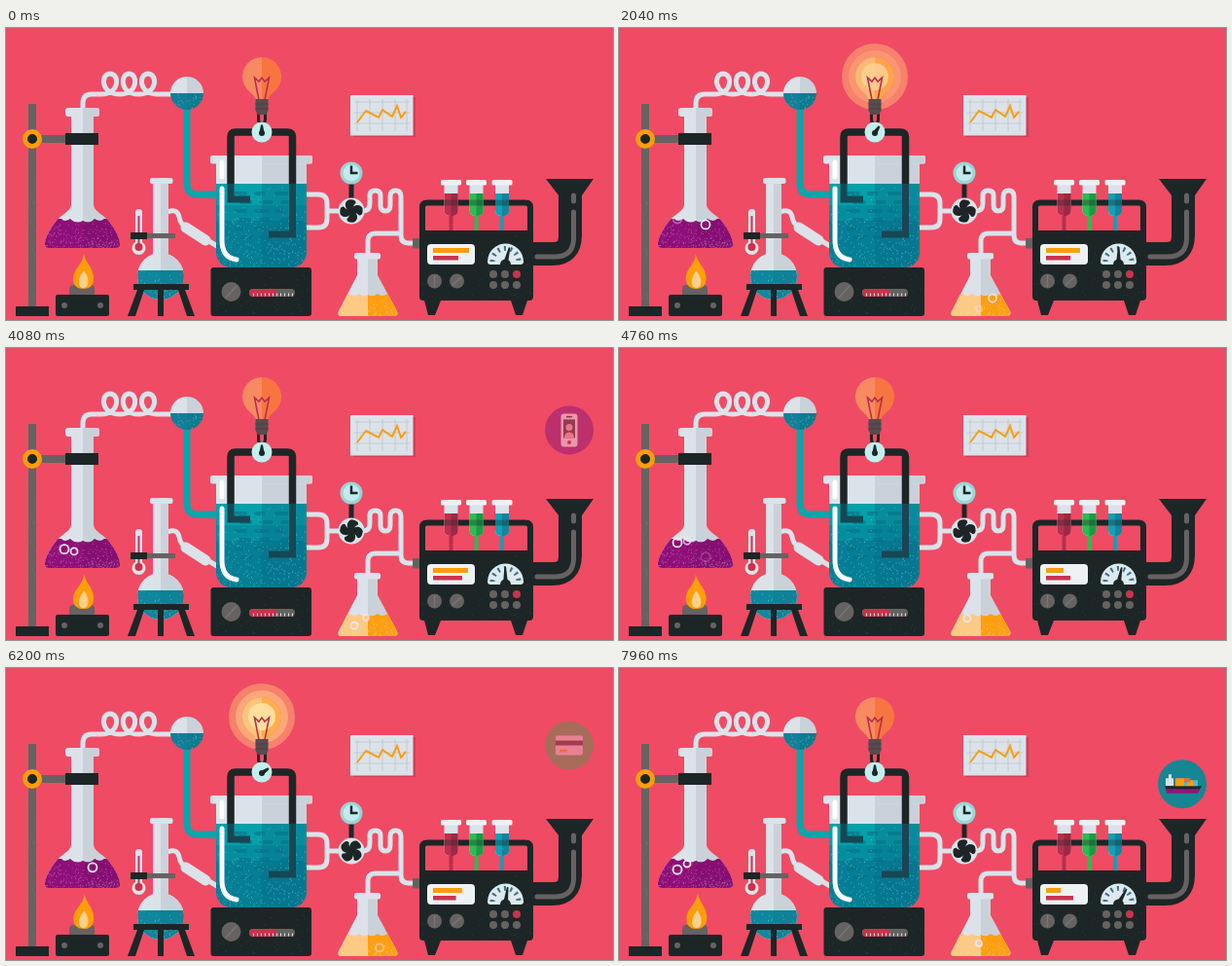
Animation of 624x300 px, one loop 8 s. Source, as an HTML page:

```html
<!DOCTYPE html>
<html lang="en">
<head>
<meta charset="utf-8">
<title>Laboratory</title>
<style>
html, body { margin: 0; width: 100%; height: 100%; overflow: hidden; background: #f04b64; }
svg { display: block; width: 624px; height: 300px; }
.k { fill: #1d2626; } .g { fill: #666262; } .l { fill: #dce2e9; } .d { fill: #c9d2da; }
.pipe { fill: none; stroke: #dce2e9; stroke-width: 5; }
.line { fill: none; }
</style>
</head>
<body>
<svg viewBox="0 0 624 300">
<defs>
  <clipPath id="coneClip"><path d="M67 88V182C66 189 57 191 51 199C45 207 41 214 40 221Q39 226 44 226H113Q118 226 117 221C116 214 112 207 106 199C100 191 91 189 90 182V88Z"/></clipPath>
  <clipPath id="ballClip"><circle cx="186" cy="67" r="17"/></clipPath>
  <clipPath id="roundClip"><circle cx="159" cy="255" r="24"/></clipPath>
  <clipPath id="beakerClip"><path d="M216 132H309V228Q309 246 291 246H234Q216 246 216 228Z"/></clipPath>
  <clipPath id="smallClip"><path d="M361 234V254L342 291Q340 296 345 296H398Q404 296 402 291L382 254V234Z"/></clipPath>
  <clipPath id="bulbClip"><path d="M257 74Q256 70 251 66A20 20 0 1 1 275 66Q270 70 269 74Z"/></clipPath>
</defs>
<rect width="624" height="300" fill="#f04b64"/>

<!-- stand -->
<path class="g" d="M23 78H31V287H23ZM36 110H62V118H36Z"/>
<g data-dots="60,23,79,7,207,#8c7579"></g>
<path class="k" d="M10 286H44V296H10Z"/>
<circle cx="27" cy="114" r="7.5" fill="#1d2626" stroke="#ff9d0a" stroke-width="5"/>

<!-- coiled tube and condenser ball -->
<path class="pipe" d="M79 86V77Q79 68 88 68H98C117 68 117 47 107 47S97 68 117 68C136 68 136 47 126.500 47S117 68 136 68C156 68 156 47 146 47S136 68 156 68H176"/>
<path class="line" d="M186 82V160Q186 171 197 171H217" stroke="#0ba5aa" stroke-width="7"/>
<g clip-path="url(#ballClip)">
  <path class="l" d="M168 49H186V67H168Z"/><path class="d" d="M186 49H204V67H186Z"/>
  <path fill="#127f96" d="M168 67H186V85H168Z"/><path fill="#0f7a90" d="M186 67H204V85H186Z"/>
  <g data-dots="40,170,50,33,34"></g>
</g>

<!-- purple flask -->
<g clip-path="url(#coneClip)">
  <path class="l" d="M38 82H79V230H38Z"/><path class="d" d="M79 82H120V230H79Z"/>
  <path fill="#8e0f78" d="M38 196H57Q60 200 66 196Q72 202 79 198Q86 202 91 196Q97 200 101 196H120V230H38Z"/>
  <path fill="#770c6a" opacity=".35" d="M79 198Q86 202 91 196Q97 200 101 196H120V230H79Z"/>
  <g data-dots="260,40,198,78,28,#d79acb"></g>
  <g id="purpleBubbles"></g>
</g>
<rect class="l" x="61" y="82" width="35" height="9" rx="3"/>
<path class="d" d="M79 82H93Q96 82 96 85V88Q96 91 93 91H79Z"/>
<path class="k" d="M61 108H95V120H61Z"/>

<!-- burner -->
<path class="g" d="M69 264H87Q91 264 91 268V275H65V268Q65 264 69 264Z"/>
<rect class="k" x="51" y="274" width="55" height="22" rx="2"/>
<circle class="g" cx="60" cy="285" r="3"/><circle class="g" cx="97" cy="285" r="3"/>
<g id="flame">
  <path fill="#ff9d0a" d="M80 232C82 242 90 246 90 257Q90 268 79.500 268T69 257C69 248 79 243 80 232Z"/>
  <path fill="#ffd08a" d="M80 249Q84.500 255 84.500 260Q84.500 267 79.500 267T75 260Q75 256 80 249Z"/>
</g>

<!-- round flask, thermometer, tripod -->
<path class="pipe" d="M166 189Q176 185 178 194Q179 202 187 206L217 224"/>
<path class="line" d="M185 205L205 218" stroke="#dce2e9" stroke-width="11" stroke-linecap="round"/>
<path class="l" d="M151 157H159V240H151Z"/><path class="d" d="M159 157H167V240H159Z"/>
<rect class="l" x="148" y="154" width="23.500" height="6" rx="2"/>
<g clip-path="url(#roundClip)">
  <path class="l" d="M134 230H159V280H134Z"/><path class="d" d="M159 230H184V280H159Z"/>
  <path fill="#0f879e" d="M134 249H159V280H134Z"/><path fill="#108197" d="M159 249H184V280H159Z"/>
  <g data-dots="85,135,235,49,44"></g>
</g>
<path class="l" d="M133 189Q133 186 136.500 186T140 189V220A7 7 0 1 1 133 220Z"/>
<path class="line" d="M136.500 193V225" stroke="#c9334e" stroke-width="2"/><circle cx="136.500" cy="225" r="4" fill="#c9334e"/>
<path class="k" d="M128 210H145V217H128Z"/><path class="g" d="M145 211H174V216H145Z"/>
<path class="k" d="M131 263H188V269H184L194 296H186L177 269H162V296H156V269H142L133 296H125L135 269H131Z"/>

<!-- hot plate -->
<rect class="k" x="210.500" y="246" width="103.500" height="50" rx="3"/>
<g data-dots="60,212,248,100,46,#4f5757"></g>
<circle class="g" cx="231.500" cy="271" r="10"/><path class="line" d="M226 277L237 265" stroke="#7b7576" stroke-width="1.500"/>
<rect class="g" x="250" y="268" width="47" height="8" rx="4"/><rect x="250" y="268" width="28" height="8" rx="4" fill="#c9334e"/>
<path class="line" d="M254 274H295" stroke="#e8d9dc" stroke-width="3" stroke-dasharray="1 3"/>

<!-- outlet pipes -->
<g class="pipe">
  <path d="M309 171H321Q330 171 330 180V196Q330 205 321 205H309M330 188H345"/>
  <path d="M367 188Q374 188 374 180V172Q374 167 379.500 167T385 172V182Q385 188 390 188T395 182V173Q395 167 400.500 167T406 173V213Q406 221 414 221H420"/>
  <path d="M406 211H380Q372 211 372 219V234"/>
</g>
<path class="k" d="M352.500 159H357.500V176H352.500Z"/>
<circle cx="355" cy="149" r="11.500" fill="#98d3d5"/><circle cx="355" cy="149" r="8.500" fill="#c3ebeb"/>
<path class="line" d="M355 141.500V149H361.500" stroke="#1d2626" stroke-width="2.500"/>
<circle class="l" cx="355" cy="188" r="13.500"/>
<g id="fan" class="k"></g>

<!-- beaker -->
<g clip-path="url(#beakerClip)">
  <path class="l" d="M216 131H263V161H216Z"/><path class="d" d="M263 131H310V161H263Z"/>
  <path fill="#05a0a8" d="M216 160H263V247H216Z"/><path fill="#078c9c" d="M263 160H310V247H263Z"/>
  <path fill="#05718c" opacity=".35" d="M216 182H310V247H216Z"/><path fill="#05718c" opacity=".5" d="M216 198H310V247H216Z"/>
  <g id="dashes" stroke="#066f88" stroke-width="4" stroke-linecap="round" fill="none"></g>
  <g data-dots="260,217,161,92,84"></g>
</g>
<rect class="l" x="210" y="131" width="105" height="8.500" rx="2"/>
<path class="d" d="M263 131H313Q315 131 315 133V137.500Q315 139.500 313 139.500H263Z"/>
<path class="line" d="M222 138V153M222 165V218Q222 236 237 238" stroke="#fff" stroke-width="5" stroke-linecap="round"/>
<path class="line" d="M231 160V176H251M294.500 160V212H270" stroke="#164753" stroke-width="7"/>
<path class="line" d="M231 160V112Q231 107 236 107H289Q294.500 107 294.500 112V160" stroke="#1d2626" stroke-width="7.500"/>

<!-- bulb -->
<path class="line" d="M259.500 86V94Q259.500 98 263 98T266.500 94V86" stroke="#1d2626" stroke-width="3"/>
<circle id="halo" cx="263" cy="50" r="34" fill="#ffb274"/>
<circle id="halo2" cx="263" cy="50" r="27" fill="#ffc17f"/>
<g clip-path="url(#bulbClip)">
  <path fill="#f88a62" d="M240 28H263V76H240Z"/><path fill="#f87542" d="M263 28H286V76H263Z"/>
  <g id="lit"><path fill="#ffc37c" d="M240 28H263V76H240Z"/><path fill="#ffae50" d="M263 28H286V76H263Z"/>
  <circle cx="263" cy="50" r="14" fill="#ffdf9c"/></g>
</g>
<path class="line" d="M260 74L255.500 51L260 55L263 51L266 55L270.500 51L266 74" stroke="#b92f49" stroke-width="1.600"/>
<path fill="#594b4e" d="M256.500 73H269.500V85L267 89H259L256.500 85Z"/>
<path class="line" d="M256.500 78H269.500M256.500 83H269.500" stroke="#4a3f42"/>
<circle cx="263" cy="107" r="10.500" fill="#c3eeee"/>
<g id="dial"><path class="k" d="M260.500 108L262 99.500H264L265.500 108Z"/></g><circle class="k" cx="263" cy="108" r="3"/>

<!-- wall chart -->
<path fill="#bc3e55" opacity=".7" d="M357 71H421V112H357Z"/><path class="l" d="M354 69H418.500V110.500H354Z"/>
<path class="line" d="M361 73V106M374 73V106M387 73V106M400 73V106M412 73V106M358 76H415M358 87H415M358 98H415" stroke="#bcc5ce" stroke-width=".8"/>
<path class="line" d="M361 97L370 85L383 92L387 84L397 91L402 80L406 92L411 86" stroke="#ff9d0a" stroke-width="2"/>

<!-- small flask -->
<g clip-path="url(#smallClip)">
  <path class="l" d="M338 232H372V298H338Z"/><path class="d" d="M372 232H406V298H372Z"/>
  <path fill="#fdca85" d="M338 273H353Q358 277 363 273Q368 277 372 274V298H338Z"/><path fill="#ff9f12" d="M372 274Q377 277 382 273Q387 277 392 273H406V298H372Z"/>
  <g data-dots="75,342,276,60,20,#ffe0b0"></g>
  <g id="orangeBubbles"></g>
</g>
<rect class="l" x="358" y="231" width="27" height="6.500" rx="2"/>

<!-- icons rise behind the funnel -->
<g id="icons">
  <g><circle r="25" fill="#8e1877"/><rect x="-8.500" y="-17" width="17" height="34" rx="3" fill="#e8dfe8"/>
    <path fill="#3b2b49" d="M-6 -11H6V8H-6Z"/><path fill="#e8a09a" d="M-5 8Q-5 2 0 2T5 8Z"/><circle cy="-3" r="3.500" fill="#e8a09a"/><circle cy="12.500" r="2" fill="#8e1877"/><path class="k" d="M-3 -14.500H3V-13H-3Z"/></g>
  <g><circle r="25" fill="#2ba84a"/><rect class="l" x="-14" y="-10" width="28" height="20" rx="2"/><path class="k" d="M-14 -5H14V0H-14Z"/><path fill="#ff9d0a" d="M-10 4H-2V7H-10Z"/></g>
  <g><circle r="25" fill="#168693"/><path class="l" d="M-17 2V-6H-14V-10H-11V-6H-9V2Z"/><path class="k" d="M-18 2H20L17 7H-16Z"/><path fill="#8e1877" d="M-17 5H18L16 9.500H-16Z"/>
    <path fill="#ff9d0a" d="M-7 -6H2V2H-7ZM5 -4H11V2H5Z"/><path fill="#e96b48" d="M2 -6H8V-2H2Z"/><path fill="#5db6c2" d="M2 -2H5V2H2ZM11 -4H16V2H11Z"/></g>
</g>

<!-- machine -->
<path class="line" d="M542 232H562Q580 232 580 213V170" stroke="#1d2626" stroke-width="24"/>
<path class="k" d="M555 155H604L592 172V184H568V172Z"/>
<path class="line" d="M546 235H564Q583.500 235 583.500 216V189M583.500 172V178" stroke="#666262" stroke-width="5" stroke-linecap="round"/>
<path class="g" d="M418 216H427V226.500H418Z"/>
<path class="line" d="M428 212V184Q428 179.500 433 179.500H534Q539 179.500 539 184V212" stroke="#1d2626" stroke-width="6"/>
<g id="tubes"></g>
<path class="k" d="M425 208H542V276Q542 280 538 280H536L531 295H524L519 280H447L441 295H434L430 280H429Q425 280 425 276Z"/>
<g data-dots="60,427,210,113,68,#4f5757"></g>
<rect x="433" y="222" width="49" height="21" rx="4" fill="#eef2f4"/>
<rect id="orangeBar" x="439" y="226" height="5" fill="#ff9d0a"/><rect id="redBar" x="439" y="234" height="4.500" fill="#c9334e"/>
<path fill="#dceaf0" d="M495 240A18.500 18.500 0 0 1 532 240Q532 243 529 243H498Q495 243 495 240Z"/>
<path class="line" d="M500 240A13.500 13.500 0 0 1 527 240" stroke="#3f7282" stroke-width="5" stroke-dasharray="2 4.500"/>
<g id="needle"><path class="k" d="M511 242L512.700 225H514.300L516 242Z"/></g><path class="k" d="M508 243A5.500 5.500 0 0 1 519 243Z"/>
<g class="g"><circle cx="440.500" cy="260" r="7.500"/><circle cx="463.500" cy="260" r="7.500"/>
  <circle cx="501" cy="253" r="4"/><circle cx="513" cy="253" r="4"/><circle cx="501" cy="264" r="4"/><circle cx="513" cy="264" r="4"/><circle cx="525" cy="264" r="4"/></g>
<circle cx="525" cy="253" r="4" fill="#c9334e"/>
<path class="line" d="M440.500 254V266M459 264L468 256" stroke="#7b7576" stroke-width="1.500"/>
<path id="drop" d="M0 -5Q3.500 0 3 2A3 3 0 0 1 -3 2Q-3.500 0 0 -5Z"/>
<g id="pipette">
  <path fill="#efc3ca" d="M-1.500 0H1.500L2 -7L5 -11V-26H-5V-11L-2 -7Z"/><path fill="#c9334e" opacity=".75" d="M0 -7L4 -11V-19H-4V-11Z"/>
  <rect class="k" x="-8" y="-30" width="16" height="5" rx="2"/><path class="k" d="M-6 -30V-37Q-6 -44 0 -44T6 -37V-30Z"/>
</g>
</svg>
<script>
const LOOP = 8000;
const $ = id => document.getElementById(id);
const clamp = v => Math.max(0, Math.min(1, v));
const ramp = (t, a, b) => clamp((t - a) / (b - a));
const pulse = (t, a, b, c, d) => ramp(t, a, b) * (1 - ramp(t, c, d));
const set = (el, attrs) => { for (const k in attrs) el.setAttribute(k, attrs[k]); };
function add(parent, tag, attrs) {
  const el = document.createElementNS(parent.namespaceURI, tag);
  set(el, attrs);
  return parent.appendChild(el);
}
function track(t, keys) {
  const i = Math.max(1, keys.findIndex(k => k[0] >= t));
  const [a, va] = keys[i - 1], [b, vb] = keys[i];
  return va + (vb - va) * ramp(t, a, b);
}

let seed = 7;
const random = () => (seed = seed * 16807 % 2147483647) / 2147483647;

for (const g of document.querySelectorAll('[data-dots]')) {
  const [n, x, y, w, h, color = '#9fe0e4'] = g.dataset.dots.split(',');
  let d = '';
  for (let i = 0; i < n; i++)
    d += `M${(+x + random() * w).toFixed(1)} ${(+y + Math.sqrt(random()) * h).toFixed(1)}h.8`;
  add(g, 'path', { d, stroke: color, 'stroke-width': .8, opacity: .65 });
}

for (let row = 0; row < 6; row++)
  for (let col = 0; col < 3; col++)
    add($('dashes'), 'path', { d: `M${236 + col * 21 + row % 2 * 6} ${170 + row * 9}h${7 + random() * 6}`, opacity: .55 });

for (let i = 0; i < 4; i++)
  add($('fan'), 'path', { d: 'M0 1C-7 -1 -8 -9 -3 -11.5Q5 -12.5 4.5 -8Q1.5 -6 1 0Z', transform: `rotate(${i * 90})` });

const tubes = [[457.5, '#b9304e', '#9c2945'], [483.5, '#2bbd52', '#1c9c43'], [510, '#149fb5', '#10869c']];
for (const [x, color, dark] of tubes) {
  const g = $('tubes');
  add(g, 'rect', { x: x - 2, y: 190, width: 4, height: 18, fill: color });
  add(g, 'path', { d: `M${x - 7} 160h14v27q0 6 -7 6t-7 -6Z`, fill: '#dce2e9' });
  add(g, 'path', { d: `M${x - 7} 170h14v17q0 6 -7 6t-7 -6Z`, fill: color });
  add(g, 'path', { d: `M${x} 170h7v17q0 6 -7 6Z`, fill: dark });
  add(g, 'rect', { x: x - 7, y: 176.5, width: 14, height: 6, fill: '#1d2626', opacity: .35 });
  add(g, 'rect', { x: x - 10.5, y: 156, width: 21, height: 5.5, rx: 1.5, fill: '#eef1f4' });
}

// x, radius, birth, life
const bubbleSets = [
  ['purpleBubbles', 216, 22, [[60, 4.5, 50, 2200], [60, 4.5, 3150, 2200], [60, 4.5, 6740, 3050],
    [70, 3.5, 3632, 1400], [70, 3.5, 7008, 1400], [89, 4.5, 0, 3200], [89, 4.5, 4580, 3200], [98, 3, 2420, 1600]]],
  ['orangeBubbles', 290, 16, [[357, 3.5, 270, 1500], [358, 3.5, 3615, 1500], [384, 4, 640, 1800],
    [384, 4, 5912, 1800], [370, 3, 1720, 2900], [370, 3, 6680, 2900]]]
];
const bubbles = bubbleSets.flatMap(([id, base, rise, list]) => list.map(([x, r, birth, life]) => ({
  base, rise, birth, life,
  el: add($(id), 'circle', { cx: x, r, fill: 'none', stroke: '#f3e3f0', 'stroke-width': 1.8 })
})));

const orangeKeys = [[0, 37], [1200, 20], [2100, 36], [3000, 19], [4080, 36], [4760, 18], [5440, 37], [6920, 23], [8000, 15]];
const redKeys = [[0, 26], [1200, 21], [3000, 30], [4080, 30], [5440, 20], [6920, 27], [8000, 28]];
const icons = [...$('icons').children];
const ICON_START = 3400, ICON_STEP = 2070;

function drawBulb(t) {
  const p = t < 4600 ? t - 400 : t - 4880;
  const halo = pulse(p, 0, 260, 1750, 2350);
  set($('halo'), { opacity: .52 * halo, r: 30 + 4 * ramp(p, 0, 250) });
  set($('halo2'), { opacity: .62 * pulse(p, 350, 800, 1300, 1950), r: 20 + 7 * ramp(p, 350, 800) });
  set($('lit'), { opacity: pulse(p, 150, 700, 1500, 2200) });
  set($('dial'), { transform: `rotate(${55 * pulse(p, 0, 500, 1400, 2000)} 263 108)` });
}

function drawPipette(t) {
  const n = t < 4400 ? 0 : t < 6500 ? 1 : 2;
  const p = t - n * ICON_STEP;
  const [x, color] = tubes[n];
  set($('pipette'), { transform: `translate(${x + 1} 142) rotate(44)`, opacity: pulse(p, 2790, 2870, 2960, 3120) });
  const fall = ramp(p, 2850, 3080);
  set($('drop'), { transform: `translate(${x + .5} ${144 + 46 * fall * fall})`, fill: color, opacity: fall > 0 && fall < 1 ? 1 : 0 });
}

function drawIcons(t) {
  icons.forEach((icon, i) => {
    const p = t - ICON_START - i * ICON_STEP;
    const y = 156 - 42.5 * (1 - Math.cos(Math.PI * ramp(p, 0, 920)));
    set(icon, {
      transform: `translate(579 ${y}) scale(${ramp(p, 0, 340)})`,
      opacity: 1 - ramp(p, 520, 850)
    });
  });
}

function draw(now) {
  const t = now % LOOP, s = t / 1000;
  drawBulb(t);
  drawPipette(t);
  drawIcons(t);
  for (const { el, base, rise, birth, life } of bubbles) {
    const u = (t - birth) / life;
    set(el, { cy: base - rise * u, opacity: pulse(u, 0, .3, .75, 1) });
  }
  set($('flame'), { transform: `translate(79.5 268) skewX(${2 * Math.sin(s * 7)}) scale(1 ${1 + .02 * Math.sin(s * 9)}) translate(-79.5 -268)` });
  set($('fan'), { transform: `translate(355 188) rotate(${s * 225})` });
  set($('needle'), { transform: `rotate(${14 + 16 * Math.sin(s * 2.6)} 513.5 242)` });
  $('orangeBar').setAttribute('width', track(t, orangeKeys));
  $('redBar').setAttribute('width', track(t, redKeys));
  requestAnimationFrame(draw);
}
draw(0);
</script>
</body>
</html>
```
